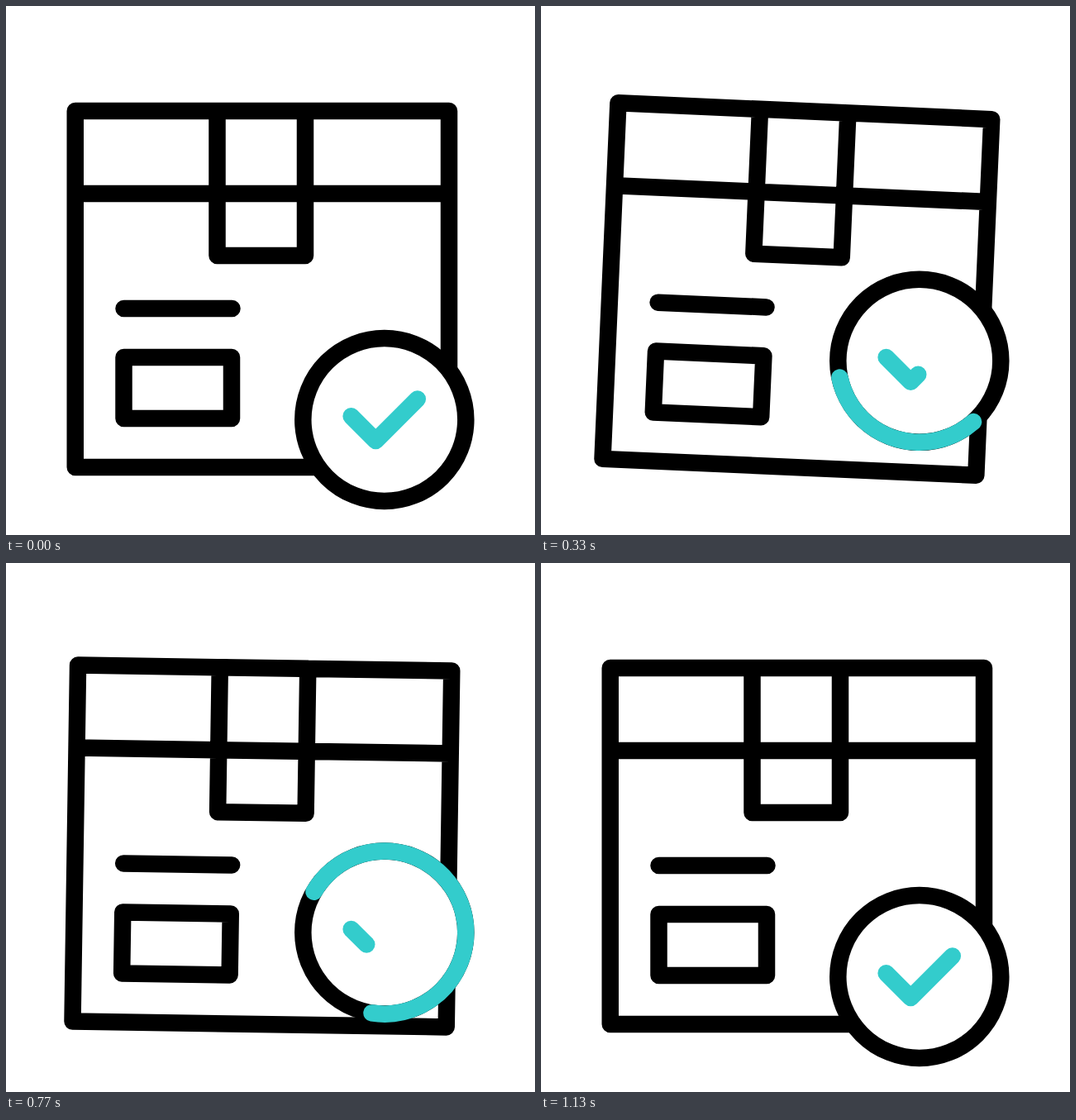
Recreate the animation shown at these times as an HTML page. Size 640 by 640 pixels, loop 1.67 s.

```html
<!DOCTYPE html>
<html lang="en">
<head>
<meta charset="utf-8">
<title>Parcel delivered</title>
<style>
  html, body { margin: 0; height: 100%; overflow: hidden; background: #fff; }
  svg { display: block; width: 100vw; height: 100vh; }
  g { fill: none; stroke: #000; stroke-width: 20.5; stroke-linecap: round; stroke-linejoin: round; }
  .teal { stroke: #3cc; }
</style>
</head>
<body>
<svg viewBox="0 0 640 640">
  <g id="box">
    <path d="M83.75 127H536V558H83.75ZM83.75 227H536M255.5 127H362V302H255.5Z"/>
    <path d="M142.5 366H273.5M142.5 425H273V499H142.5Z"/>
  </g>
  <g id="badge">
    <circle r="98.5" fill="#fff"/>
    <circle id="arc" class="teal" r="98.5" pathLength="360"/>
    <path id="tick" class="teal" pathLength="100" d="M-40.2 -4.2L-10.5 25.5L40 -25"/>
  </g>
</svg>
<script>
const LOOP = 1670, START = 100, STEP = 100 / 3, STEPS = 32;

// Keyframes as [step, value], linear in between
const tilt = [[0, 0], [5, 1.33], [11.5, 3.9], [16, -5], [22.6, 2.75], [25, 1.65], [30, 0]];
const lift = [[0, 0], [9.1, 81], [15, 0], [24.1, 81], [30, 0]];
const arcTail = [[17.33, 0], [32, 360]];
const arcHead = [[0.9, 0], [22.25, 360]];
const tickEnd = [[3, 100], [12.65, 0], [18.85, 0], [28.1, 100]];

const [box, badge, arc, tick] = ['box', 'badge', 'arc', 'tick'].map(id => document.getElementById(id));

function valueAt(keys, k) {
  const i = keys.findIndex(key => key[0] > k);
  if (i === 0) return keys[0][1];
  if (i < 0) return keys[keys.length - 1][1];
  const [k0, v0] = keys[i - 1], [k1, v1] = keys[i];
  return v0 + (v1 - v0) * (k - k0) / (k1 - k0);
}

function showLength(path, length) {
  path.style.display = length > 0.01 ? '' : 'none';
  path.setAttribute('stroke-dasharray', `${length} 1000`);
}

function draw(time) {
  // The motion advances in steps of 1/30 s; 4 ms absorbs rounding
  const step = Math.floor((time % LOOP + 4 - START) / STEP) + 1;
  const k = Math.max(0, Math.min(STEPS, step));
  const tail = valueAt(arcTail, k);

  box.setAttribute('transform', `rotate(${valueAt(tilt, k)} 309.75 342.5)`);
  badge.setAttribute('transform', `translate(457.8 ${500.5 - valueAt(lift, k)})`);
  arc.setAttribute('transform', `rotate(${4.5 + 5.5 * k + tail})`);
  showLength(arc, valueAt(arcHead, k) - tail);
  showLength(tick, valueAt(tickEnd, k));
}

function loop() {
  draw(performance.now());
  requestAnimationFrame(loop);
}
loop();
</script>
</body>
</html>
```
